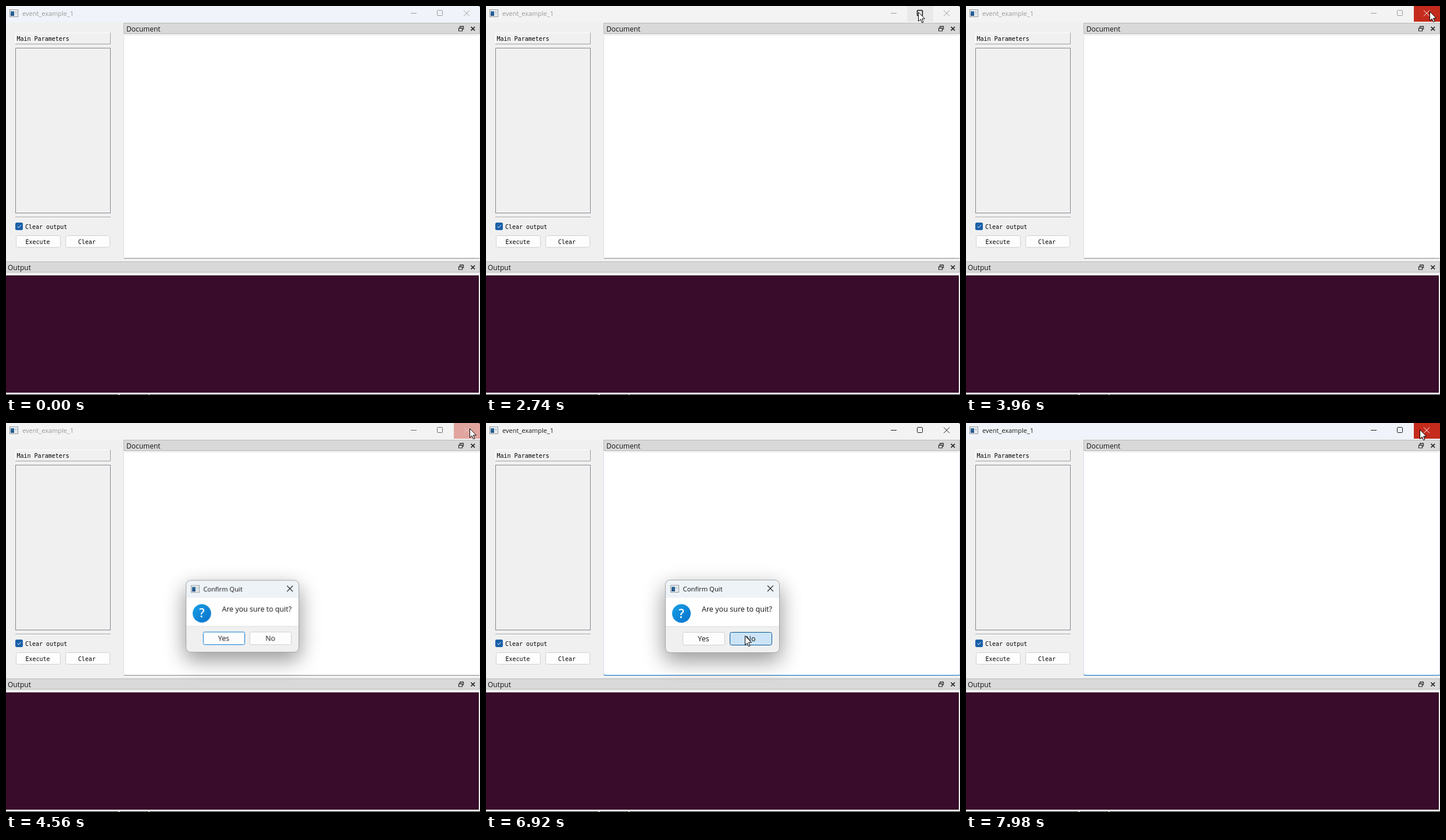
Animation of 815 by 670 pixels, one loop 8000 ms. Source, as an HTML page:

```html
<!DOCTYPE html>
<html lang="en">
<head>
<meta charset="utf-8">
<title>Window demo</title>
<style>
html, body { margin: 0; width: 100%; height: 100%; overflow: hidden; background: #f0f0f0; }
svg { display: block; width: 815px; height: 670px; }
text { font-family: "Open Sans", "Noto Sans", sans-serif; font-size: 12px; fill: #111; white-space: pre; }
.mono { font: 10px "DejaVu Sans Mono", "Liberation Mono", monospace; fill: #000; }
.line { fill: none; stroke-width: 1; }
.head { fill: #d9d9d9; stroke: #b9b9b9; }
.btn { fill: #fdfdfd; stroke: #d0d0d0; }
.cell { fill: #d9d9d9; stroke: #929292; }
.cell.used { fill: #f6f6f6; }

.anim, .anim * { animation: 8s linear infinite; }
.anim .bar { animation-name: bar; }
.anim .title { animation-name: title; font-size: 11px; }
.anim .icon { animation-name: icon; }
.anim .maxIcon { animation-name: maxIcon; }
.anim .closeIcon { animation-name: closeIcon; }
.anim .maxHover { animation-name: maxHover; }
.anim .red { animation-name: red; }
.anim .focus { animation-name: focus; animation-timing-function: step-end; }
.anim .popup { animation-name: popup; }
.anim .dialog { animation-name: dialog; transform-origin: 406px 310px; }
.anim .yes { animation-name: yes; }
.anim .no { animation-name: no; }
.anim .cursor { animation-name: cursor; }
.anim .show { animation-name: show; animation-timing-function: step-end; }

@keyframes bar {
  0%, 1% { fill: #f0f3f9; }
  5.2%, 52.7% { fill: #f3f3f3; }
  54%, 55.4% { fill: #f0f3f9; }
  57%, 86.5% { fill: #f3f3f3; }
  90%, 100% { fill: #f0f3f9; }
}
@keyframes title {
  0%, 52.7% { fill: #999; }
  52.8%, 55.5% { fill: #1a1a1a; }
  55.6%, 85.9% { fill: #999; }
  86%, 100% { fill: #1a1a1a; }
}
@keyframes icon {
  0%, 52.7% { stroke: #999; }
  52.8%, 55.5% { stroke: #1a1a1a; }
  55.6%, 85.9% { stroke: #6a6a6a; }
  86%, 100% { stroke: #1a1a1a; }
}
@keyframes maxIcon {
  0%, 27.2% { stroke: #999; stroke-width: 1px; }
  28.2%, 46.4% { stroke: #111; stroke-width: 1.5px; }
  48%, 52.7% { stroke: #999; stroke-width: 1px; }
  52.8%, 55.5% { stroke: #1a1a1a; stroke-width: 1px; }
  55.6%, 85.9% { stroke: #6a6a6a; stroke-width: 1px; }
  86%, 100% { stroke: #1a1a1a; stroke-width: 1px; }
}
@keyframes closeIcon {
  0%, 47.4% { stroke: #999; }
  48.4%, 55.5% { stroke: #fff; }
  57% { stroke: #edcfcc; }
  58.5%, 85.9% { stroke: #6a6a6a; }
  86%, 96.8% { stroke: #1a1a1a; }
  97.6%, 100% { stroke: #fff; }
}
@keyframes maxHover {
  0%, 25.2% { opacity: 0; }
  26.2%, 46.6% { opacity: 1; }
  48%, 100% { opacity: 0; }
}
@keyframes red {
  0%, 47.4% { opacity: 0; }
  48.6%, 55.5% { opacity: 1; }
  57% { opacity: .4; }
  58.3%, 96.8% { opacity: 0; }
  97.8%, 100% { opacity: 1; }
}
@keyframes focus {
  0% { opacity: 0; }
  52.8% { opacity: 1; }
  55.6% { opacity: 0; }
  86%, 100% { opacity: 1; }
}
@keyframes popup {
  0%, 40.8% { opacity: 0; transform: translateY(-8px); }
  43.2%, 46.8% { opacity: 1; transform: none; }
  49.2%, 100% { opacity: 0; transform: none; }
}
@keyframes dialog {
  0%, 55.5% { opacity: 0; transform: scale(.92); }
  56.8% { opacity: 1; transform: scale(.988); }
  57.2% { opacity: 1; transform: scale(.991); }
  58.4%, 87.6% { opacity: 1; transform: none; }
  89.2%, 100% { opacity: 0; transform: scale(.94); }
}
@keyframes yes {
  0%, 69.4% { fill: #fdfdfd; stroke: #0078d4; }
  70.5%, 83% { fill: #e5f1fb; stroke: #0078d4; }
  84%, 85.7% { fill: #fdfdfd; stroke: #0078d4; }
  85.8%, 100% { fill: #fdfdfd; stroke: #d0d0d0; }
}
@keyframes no {
  0%, 83.7% { fill: #fdfdfd; stroke: #d0d0d0; }
  84.6%, 85.7% { fill: #e5f1fb; stroke: #0078d4; }
  85.8%, 100% { fill: #cce4f7; stroke: #005499; }
}
@keyframes show {
  0% { opacity: 0; }
  .875%, 100% { opacity: 1; }
}
@keyframes cursor {
  0%, .875% { transform: translate(788px, 622px); }
  2.7% { transform: translate(727px, 347px); }
  5.25%, 13.62% { transform: translate(687px, 174px); }
  13.625%, 16.5% { transform: translate(683px, 239px); }
  18% { transform: translate(680px, 225px); }
  21.5% { transform: translate(713px, 163px); }
  24% { transform: translate(740px, 66px); }
  26.5%, 30.2% { transform: translate(756px, 0); }
  34.25%, 45.5% { transform: translate(743px, 10px); }
  49.5%, 57.8% { transform: translate(797px, 9px); }
  62% { transform: translate(529px, 297px); }
  71.25%, 82.1% { transform: translate(390px, 366px); }
  84.6%, 88.9% { transform: translate(445px, 366px); }
  92.75% { transform: translate(667px, 118px); }
  99%, 100% { transform: translate(780px, 11px); }
}
</style>
</head>
<body>
<svg class="anim" viewBox="0 0 815 670">
  <defs>
    <linearGradient id="blue" x2="1" y2="1">
      <stop stop-color="#1ba1e6"/><stop offset="1" stop-color="#0870cb"/>
    </linearGradient>
    <linearGradient id="pane" x2="0" y2="1">
      <stop stop-color="#2f6f9f"/><stop offset="1" stop-color="#1e4f85"/>
    </linearGradient>
    <g id="app">
      <rect x=".5" y=".5" width="14" height="12" fill="#f4f4f4" stroke="#8d9499"/>
      <rect x="2" y="3" width="6" height="8" fill="url(#pane)"/>
      <path d="M9 3h4v4h-4z" fill="#c9d3da"/>
      <path d="M9 8h4v3h-4z" fill="#dfe4e7"/>
    </g>
    <g id="dock" fill="none" stroke="#2b2b2b">
      <path d="M2.5 3V.5h6v5H6.5M2 1h7" stroke-width="1.2"/>
      <path d="M.5 3.5h6v5h-6zM0 4h7" stroke-width="1.2"/>
      <path d="M21.5 1.3l6.6 6.6m0-6.6l-6.6 6.6" stroke-width="1.7"/>
    </g>
  </defs>

  <!-- title bar -->
  <rect width="815" height="670" fill="#f0f0f0"/>
  <rect class="bar" width="815" height="28" fill="#f3f3f3"/>
  <use href="#app" x="6" y="6"/>
  <text class="title" x="28" y="17">event_example_1</text>
  <rect class="maxHover" x="724" width="45" height="27" fill="#e9e9e9"/>
  <rect class="red" x="770" width="45" height="27" fill="#c42b1c"/>
  <path class="line icon" d="M696 12.5h10"/>
  <rect class="line maxIcon" x="741.5" y="7.5" width="9" height="9" rx="1"/>
  <path class="line closeIcon" d="M787 7.5l10 10m0-10l-10 10"/>
  <path d="M813 0h2v2z" fill="#444"/>

  <!-- parameters -->
  <path class="line" d="M16.5 66V46.5H180" stroke="#fff"/>
  <path class="line" d="M16 65.5h163.5V46" stroke="#a0a0a0"/>
  <text class="mono" x="18.5" y="60">Main Parameters</text>
  <rect class="line" x="16.5" y="72.5" width="163" height="284" stroke="#828790"/>
  <path class="line" d="M16 363.5h164" stroke="#a0a0a0"/>
  <path class="line" d="M16 364.5h164" stroke="#fff"/>
  <rect x="16" y="373" width="13" height="13" rx="2.5" fill="#1a60a8"/>
  <path class="line" d="M19.5 379.7l2.2 2.1 4-4.2" stroke="#fff"/>
  <text class="mono" x="33" y="384">Clear output</text>
  <rect class="btn" x="17.5" y="395.5" width="76" height="20" rx="3"/>
  <rect class="btn" x="102.5" y="395.5" width="76" height="20" rx="3"/>
  <text class="mono" x="33.5" y="410">Execute</text>
  <text class="mono" x="124" y="410">Clear</text>

  <!-- document -->
  <rect class="head" x="202.5" y="29.5" width="612" height="18"/>
  <text x="207" y="44">Document</text>
  <use href="#dock" x="778" y="34.5"/>
  <rect x="203" y="51" width="611" height="384" fill="#fff"/>
  <path class="line" d="M202.5 51v383" stroke="#e2e2e2"/>
  <path class="line" d="M203 434.5h611" stroke="#868686"/>
  <g class="focus">
    <path class="line" d="M202.5 51v382m612-382v382" stroke="#d5e0ea"/>
    <path class="line" d="M202.5 433l1 1.5h610.500l1-1.5" stroke="#0067c0" stroke-width="1.4"/>
  </g>

  <!-- output -->
  <rect class="head" x="-.5" y="440.500" width="815" height="18"/>
  <text x="3" y="455">Output</text>
  <use href="#dock" x="778" y="445.500"/>
  <rect y="464" width="813" height="202" fill="#380c2a"/>
  <rect y="668" width="815" height="1" fill="#b5b5b5"/>
  <rect y="669" width="815" height="1" fill="#4a4a4a"/>
  <path d="M193 669h3v1h-3zM245 669h2v1h-2z" fill="#ddd"/>

  <!-- layout flyout -->
  <g class="popup">
    <rect x="575" y="35" width="300" height="242" rx="8" fill="#000" opacity=".22" style="filter:blur(7px)"/>
    <rect x="574.500" y="28.500" width="300" height="243" rx="8" fill="#f0f0f0" stroke="#c6c6c6"/>
    <g id="cells"></g>
    <circle cx="663" cy="75" r="10" fill="#21c5e6"/>
    <circle cx="773" cy="58" r="10" fill="#21c5e6"/>
    <rect x="764" y="83" width="17" height="17" rx="3" fill="#fff"/>
  </g>

  <!-- confirm dialog -->
  <g class="dialog">
    <rect x="306" y="282" width="201" height="128" rx="10" fill="#000" opacity=".4" style="filter:blur(18px)"/>
    <rect x="308.500" y="270.500" width="196" height="125" rx="8" fill="#f0f0f0"/>
    <path d="M309 301v-22a8 8 0 0 1 8-8h179a8 8 0 0 1 8 8v22z" fill="#eef3f7"/>
    <rect x="309" y="301" width="195" height="49" fill="#fff"/>
    <path class="line" d="M309 350.500h195" stroke="#dfdfdf"/>
    <rect class="line" x="308.500" y="270.500" width="196" height="125" rx="8" stroke="#a3a5a7"/>
    <use href="#app" x="317" y="279"/>
    <text x="338.500" y="290" style="font-size:11.300px">Confirm Quit</text>
    <path class="line" d="M484 280l10 10m0-10l-10 10" stroke="#222" style="stroke-width:1.2"/>
    <circle cx="336" cy="328" r="16" fill="url(#blue)"/>
    <text x="336" y="335.500" text-anchor="middle" style="font-size:21px;font-weight:600;fill:#fff">?</text>
    <text x="371" y="325" style="font-size:12.600px">Are you sure to quit?</text>
    <rect class="btn yes" x="338.500" y="360.500" width="72" height="22" rx="3"/>
    <rect class="btn no" x="419.500" y="360.500" width="72" height="22" rx="3"/>
    <text x="374" y="376" text-anchor="middle" style="font-size:12.500px">Yes</text>
    <text x="455" y="376" text-anchor="middle" style="font-size:12.500px">No</text>
  </g>

  <g class="cursor"><g class="show">
    <path d="M.5.7v15.600l3.600-3.400 2.500 5.700 2.400-1-2.500-5.600h5z" fill="#fff" stroke="#000"/>
  </g></g>
</svg>
<script>
const cells = document.getElementById("cells");
const FULL = 64, HALF = 30;

function cell(x, y, w, h, used) {
  const r = document.createElementNS("http://www.w3.org/2000/svg", "rect");
  const box = { x: x + .5, y: y + .5, width: w - 1, height: h - 1, rx: 3 };
  for (const k in box) r.setAttribute(k, box[k]);
  r.setAttribute("class", used ? "cell used" : "cell");
  cells.append(r);
}
function split(x, y, w, usedTop, usedLow) {
  cell(x, y, w, HALF, usedTop);
  cell(x, y + 34, w, HALF, usedLow);
}

cell(588, 43, 47, FULL);
cell(639, 43, 47, FULL, true);
cell(698, 43, 47, FULL);
split(749, 43, 47, true, true);
split(808, 43, 47, false, true);

cell(588, 119, 47, FULL);
cell(639, 119, 47, FULL);
cell(698, 119, 63, FULL);
cell(765, 119, 31, FULL);
cell(808, 119, 31, FULL);

cell(588, 195, 47, FULL);
for (const x of [639, 698, 749]) split(x, 195, 47);
cell(808, 195, 31, FULL);
</script>
</body>
</html>
```
